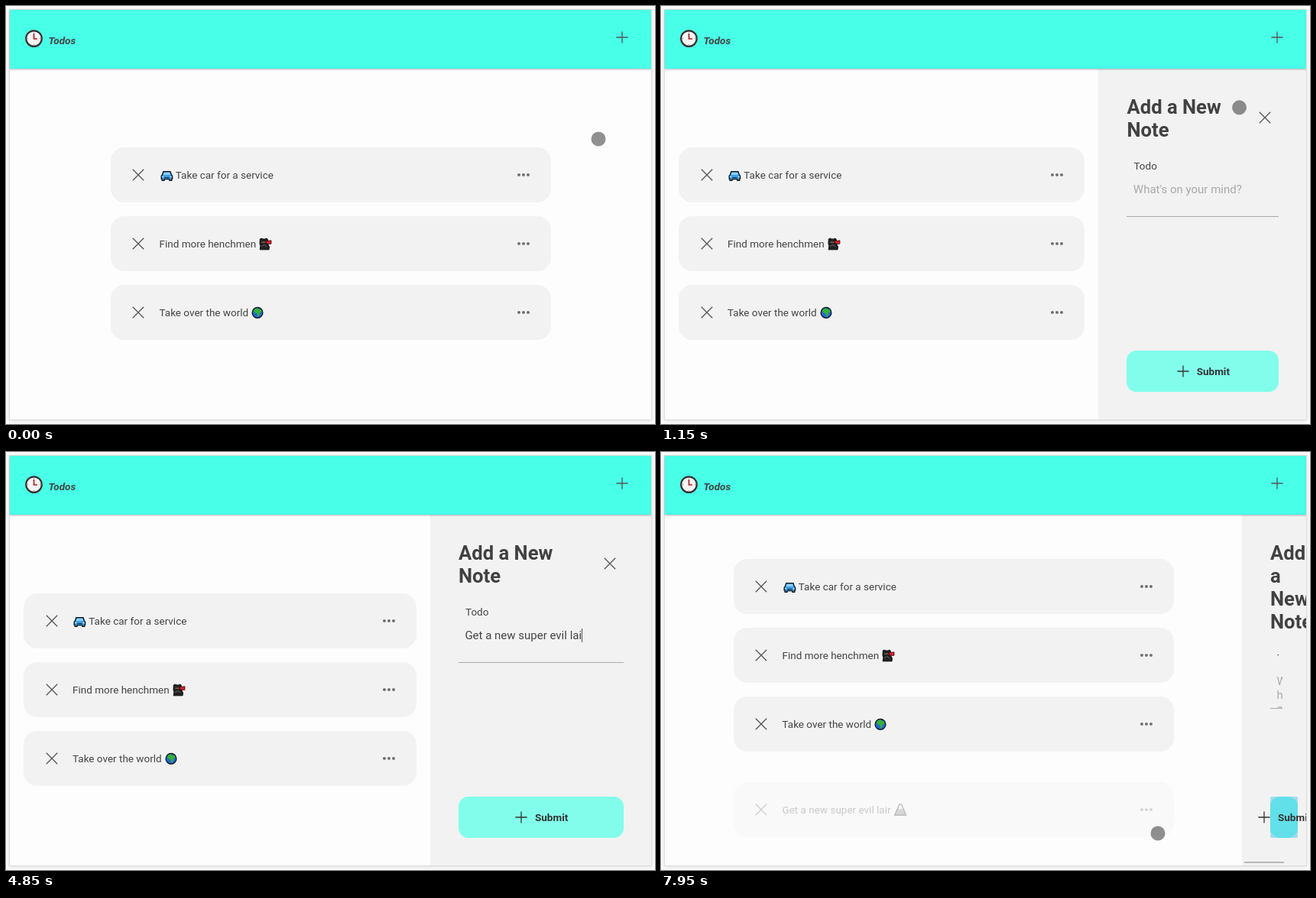
Animation of 849 by 547 pixels, one loop 8 s. Source, as an HTML page:

```html
<!DOCTYPE html>
<html lang="en">
<head>
<meta charset="utf-8">
<title>Todos</title>
<style>
  html, body { margin: 0; width: 100%; height: 100%; overflow: hidden; background: #fff; }
  body { font: 13.5px Roboto, Arial, sans-serif; color: #444; }
  #stage { position: relative; width: 849px; height: 547px; overflow: hidden; background: #fcfcfc; }
  #stage * { box-sizing: border-box; }
  .abs { position: absolute; }
  #app { left: 5px; top: 5px; width: 839px; height: 536px; background: #fdfdfd;
         box-shadow: 0 0 0 1px #dedede, 0 1px 5px 1px rgba(0,0,0,.13); }
  #view { left: 0; top: 0; width: 844px; height: 541px; overflow: hidden; }
  header { left: 5px; top: 5px; width: 839px; height: 76.5px; background: #48ffe8;
           box-shadow: 0 1px 2px rgba(0,0,0,.3); }
  header b { position: absolute; left: 50.5px; top: 30px; line-height: 20px; font-style: italic; }
  svg { display: block; flex: none; overflow: visible; }
  .ico { fill: none; stroke: #555; stroke-width: 1.3; }
  .item { position: absolute; height: 72px; border-radius: 18px; background: #f2f2f2;
          display: flex; align-items: center; padding-left: 64px; white-space: pre; }
  .item .x { position: absolute; left: 27.5px; top: 27px; }
  .item .dots { position: absolute; right: 27px; top: 27px; fill: #6c6c6c; }
  .item .pic { margin: 0 3.3px; }
  .item .pic.first { margin-left: 0; }
  #panel { top: 82px; height: 459px; overflow: hidden; background: #f2f2f2; }
  #form { left: 37px; top: 35px; }
  #head { display: flex; align-items: center; }
  h2 { margin: 0; flex: 1 0 0; min-width: min-content; font: 700 25.6px/30px Roboto, Arial, sans-serif; color: #414141; }
  #close { width: 36px; flex: none; padding: 0 9px 3px; }
  #label { margin-top: 23px; height: 18px; line-height: 18px; padding-left: 9px; overflow: hidden; white-space: nowrap; }
  #field { position: relative; margin-top: 4px; height: 54px; padding: 9px 8px 0 8.4px; border-bottom: 1px solid #aaa;
           font-size: 15px; line-height: 18px; overflow: hidden; white-space: pre-wrap; overflow-wrap: anywhere; }
  #hint { color: #a9a9a9; }
  #peak { display: inline-block; vertical-align: middle; margin: -2px 0 -1px 1px; }
  #caret { display: inline-block; vertical-align: top; width: 1px; height: 18px; margin-right: -1px; background: #555; }
  #thumb { right: 1px; top: 3px; width: 3px; height: 21px; background: #b0b0b0; }
  #submit { left: 37px; top: 368.5px; height: 54px; border-radius: 13px; background: #82fdec; color: #333; }
  #submit b { position: absolute; left: calc(50% - 8px); top: 17.5px; line-height: 20px; }
  #submit svg { position: absolute; left: calc(50% - 35px); top: 18.5px; stroke: #333; }
  .tap { background: rgba(51,181,229,.4); border-radius: 2px; }
  #glow { inset: 0; }
  #bar { left: 3px; top: 454px; height: 2px; background: #b8b8b8; }
  #cursor { left: -9.5px; top: -9.5px; width: 19px; height: 19px; border-radius: 50%; background: rgba(0,0,0,.43); }
  #cursor.down { background: rgba(30,40,40,.55); box-shadow: 0 0 0 1.5px rgba(255,255,255,.75); }
</style>
</head>
<body>
<svg width="0" height="0" style="position:absolute">
  <symbol id="cross" viewBox="0 0 18 18"><path d="M1.8 1.8 16.2 16.2M16.2 1.8 1.8 16.2"/></symbol>
  <symbol id="plus" viewBox="0 0 18 18"><path d="M9 1.4V16.6M1.4 9H16.6"/></symbol>
  <symbol id="dots" viewBox="0 0 18 18">
    <rect x="1.2" y="7.3" width="3.6" height="3.5" rx="1.2"/><rect x="7.2" y="7.3" width="3.6" height="3.5" rx="1.2"/>
    <rect x="13.2" y="7.3" width="3.6" height="3.5" rx="1.2"/>
  </symbol>
  <symbol id="car" viewBox="0 0 18 18">
    <path d="M4.8 4.7H14L15.4 9 16.6 10.2V14.2H15.8V16.4H12.9V14.6H6V16.4H3.1V14.2H2.2V10.2L3.4 9Z" fill="#3d9fe8" stroke="#101418" stroke-width="1.3"/>
    <path d="M5.6 6H13.2L14 9H4.8Z" fill="#8fd0fa"/><path d="M6.2 12.6H12.6" stroke="#123" stroke-width="1.1"/>
    <path d="M3.4 11.5H5M13.8 11.5H15.4" stroke="#fff" stroke-width="1.2"/>
  </symbol>
  <symbol id="guard" viewBox="0 0 18 18">
    <path d="M2.3 3 4 2 6 3H9L11 2 12.3 3.4V9L14.4 13 14 16.8H2.2L3 12 2 9.4Z" fill="#222" stroke="#0c0c0c"/>
    <path d="M4.4 6.4H9.6V8H4.4Z" fill="#7a5a50"/><path d="M4 12.5 8 10.5 11 13" fill="none" stroke="#666"/>
    <path d="M9.6 5.6 17 4.8V9.2L13 9.6 10.6 8.2Z" fill="#d3222c" stroke="#300" stroke-width=".7"/>
  </symbol>
  <symbol id="globe" viewBox="0 0 18 18">
    <circle cx="9" cy="9.4" r="6.9" fill="#2467d0" stroke="#101820" stroke-width="1.3"/>
    <path d="M5.2 4.6 9 3.3 11 5 13.5 5.2 14.6 8 12.2 9.6 11 13.6 9.2 14.6 8.4 10.6 5.6 9.6 4 7Z" fill="#35b234"/>
  </symbol>
  <symbol id="mount" viewBox="0 0 18 18">
    <path d="M8 1.9H10.4L16.6 16.2H1.6Z" fill="#777" stroke="#161616" stroke-width="1.4" stroke-linejoin="round"/>
    <path d="M8.2 2.8H10.2L12.6 8.4 10.8 7.4 9.2 9 7.6 7.4 5.9 8.4Z" fill="#e6e6e6"/>
  </symbol>
</svg>

<div id="stage">
  <div id="app" class="abs"></div>
  <div id="view" class="abs">
    <div id="list"></div>
    <div id="panel" class="abs">
      <div id="form" class="abs">
        <div id="head"><h2>Add a New Note</h2><div id="close"><svg class="ico" width="18" height="18"><use href="#cross"/></svg></div></div>
        <div id="label">Todo</div>
        <div id="field"><span id="typed"></span><svg id="peak" width="20" height="20"><use href="#mount"/></svg><span id="caret"></span><span id="hint">What's on your mind?</span><div id="thumb" class="abs"></div></div>
      </div>
      <div id="submit" class="abs">
        <div id="glow" class="abs tap"></div>
        <svg class="ico" width="18" height="18"><use href="#plus"/></svg><b>Submit</b>
      </div>
      <div id="bar" class="abs"></div>
    </div>
    <header class="abs">
      <svg class="abs" style="left:19px;top:25px" width="25" height="25">
        <circle cx="12.5" cy="12.6" r="10.3" fill="#f5f5f5" stroke="#3a3030" stroke-width="2.2"/>
        <path d="M12.5 6V13H17" fill="none" stroke="#b3202a" stroke-width="1.7"/>
        <path d="M12.5 4V5.2M12.5 20V21.2M4 12.6H5.2M20 12.6H21" stroke="#888"/>
      </svg>
      <b>Todos</b>
      <svg class="ico abs" style="left:792px;top:27px" width="18" height="18"><use href="#plus"/></svg>
      <div id="addTap" class="abs tap" style="left:783px;top:18px;width:36px;height:40px"></div>
    </header>
  </div>
  <div id="cursor" class="abs"></div>
</div>

<script>
const LOOP = 8000, LEFT = 5, RIGHT = 844, OPEN = 289;
const $ = id => document.getElementById(id);
const ui = {};
for (const id of ['panel', 'form', 'typed', 'peak', 'caret', 'hint', 'thumb', 'submit', 'glow', 'bar', 'addTap', 'cursor'])
  ui[id] = $(id);

const icon = (name, cls) => `<svg class="${cls}" width="18" height="18"><use href="#${name}"/></svg>`;
const items = [
  icon('car', 'pic first') + 'Take car for a service',
  'Find more henchmen' + icon('guard', 'pic'),
  'Take over the world' + icon('globe', 'pic'),
  'Get a new super evil lair' + icon('mount', 'pic')
].map(html => {
  const el = document.createElement('div');
  el.className = 'item';
  el.innerHTML = icon('cross', 'ico x') + html + icon('dots', 'dots');
  $('list').append(el);
  return el;
});

const TEXT = 'Get a new super evil lair ';
const KEYS = [1910, 1960, 2140, 2390,
  ...Array.from({ length: 8 }, (_, i) => 2570 + 93 * i - (i ? 1 : 0)),
  3400, 3460, 3520, 3580, 3700, 3840, 3980, 3980, 4120, 4240, 4730, 4850, 4970, 5090];

// time, x, y
const PATH = [[121, 774.5, 173.5], [180, 776, 168], [320, 795, 95], [440, 811, 30], [610, 806.5, 61.5],
  [960, 806.5, 61.5], [1150, 752, 138], [1430, 680, 238], [7121, 680, 238], [7180, 677, 258],
  [7475, 647.5, 419.5], [7590, 645, 470], [7700, 649.5, 498.5]];

const within = (t, ...spans) => spans.some(([a, b]) => t >= a && t < b);
const show = (el, on) => { el.style.display = on ? '' : 'none'; };

// Movement advances in ticks of 59 ms.
function tick(t) {
  for (const [a, b] of [[180, 650], [900, 1430], [7180, 7710]])
    if (t >= a && t < b) return a + Math.floor((t - a) / 59) * 59;
  return t;
}

function cursorAt(t) {
  const i = PATH.findIndex(p => p[0] > t);
  if (i === 0) return PATH[0].slice(1);
  if (i < 0) return PATH[PATH.length - 1].slice(1);
  const a = PATH[i - 1], b = PATH[i], k = (t - a[0]) / (b[0] - a[0]);
  return [a[1] + (b[1] - a[1]) * k, a[2] + (b[2] - a[2]) * k];
}

function panelWidth(t) {
  if (t < 900) return 0;
  if (t >= 7950) return 84;
  if (t >= 7890) return 180;
  const k = Math.min(1, (t - 893) / 400);
  return OPEN * (1 - (1 - k) ** 3);
}

function drawList(t, w) {
  const room = RIGHT - LEFT - w, width = Math.min(576, room - 36);
  const added = t >= 7890, late = t >= 7950;
  items.forEach((el, i) => {
    const fresh = i === 3;
    show(el, !fresh || added);
    el.style.left = LEFT + (room - width) / 2 + 'px';
    el.style.width = width + 'px';
    el.style.top = (added ? 140 : 185) + 90 * i + (fresh ? (late ? 22 : 40) : 0) + 'px';
    el.style.opacity = fresh ? (late ? .28 : .1) : 1;
  });
}

function drawPanel(t, w) {
  const inner = Math.max(w - 73, 0), scroll = 128;
  ui.panel.style.left = RIGHT - w + 'px';
  ui.panel.style.width = w + 'px';
  ui.form.style.width = inner + 'px';
  ui.submit.style.width = Math.max(inner, 36) + 'px';
  show(ui.glow, t >= 7890);
  show(ui.thumb, w > 100 && w < 170);
  show(ui.bar, w > 6 && w < scroll);
  ui.bar.style.width = Math.max(0, (w - 5) * w / scroll) + 'px';

  const sent = t >= 7890;
  const text = sent ? '' : TEXT.slice(0, KEYS.filter(k => k <= t).length);
  if (ui.typed.textContent !== text) ui.typed.textContent = text;
  const emoji = t >= 7000 && !sent;
  show(ui.peak, emoji);
  $('field').style.paddingTop = emoji ? '11px' : '9px';
  show(ui.hint, !text);
  show(ui.caret, within(t, [1730, 5650], [6140, 6690], [7000, 7470]));
}

function drawCursor(t, move) {
  const [x, y] = cursorAt(move);
  show(ui.cursor, within(t, [0, 1850], [5650, 6320], [7180, LOOP]));
  ui.cursor.style.transform = `translate(${x}px, ${y}px)`;
  ui.cursor.className = 'abs' + (within(t, [900, 1010], [1610, 1730], [7890, 7950]) ? ' down' : '');
  show(ui.addTap, within(t, [900, 1070]));
}

function render(t) {
  const move = tick(t), w = panelWidth(move);
  drawList(t, w);
  drawPanel(t, w);
  drawCursor(t, move);
}

const start = performance.now();
function loop() {
  render((performance.now() - start) % LOOP);
  requestAnimationFrame(loop);
}
loop();
</script>
</body>
</html>
```
